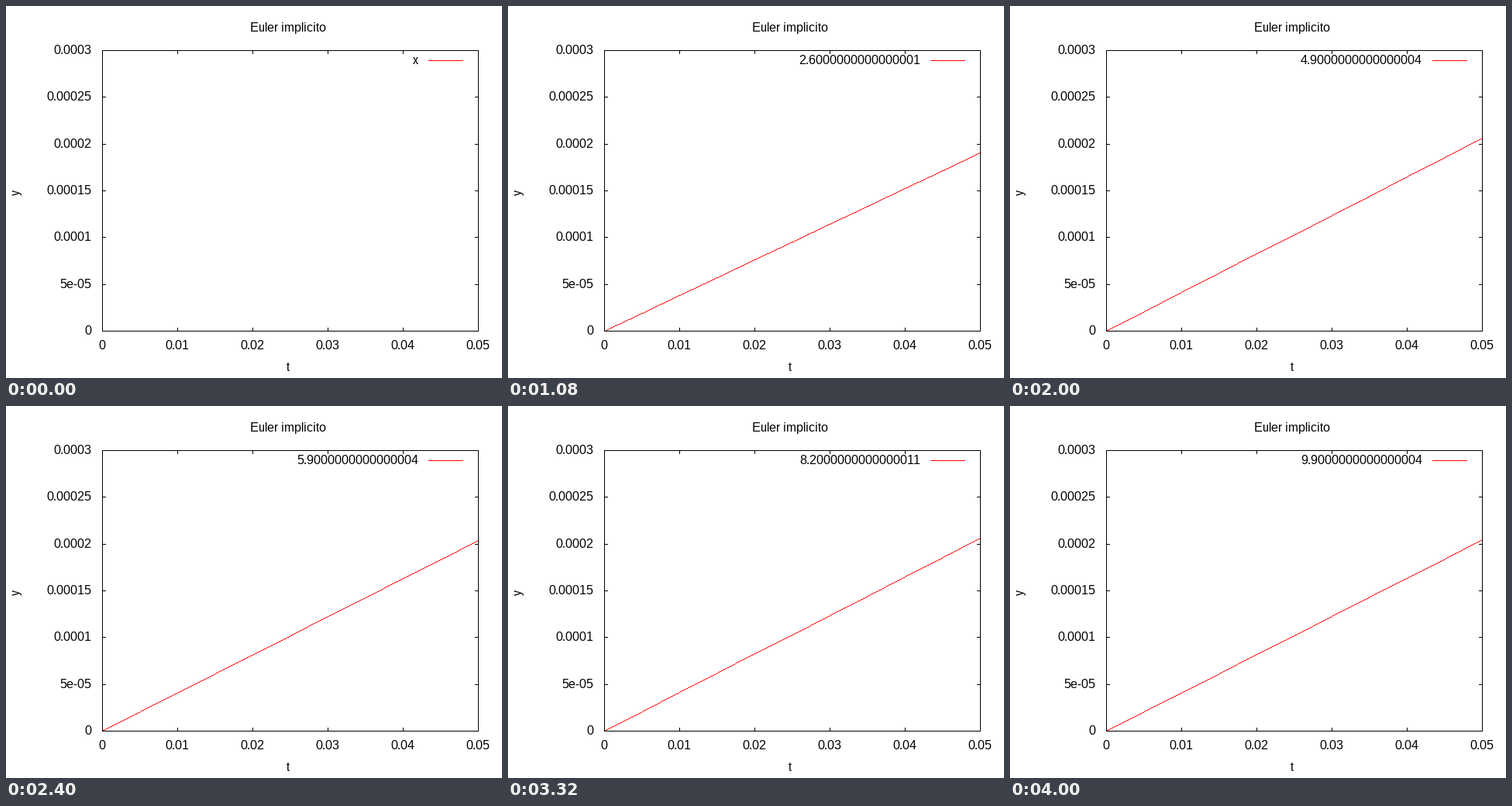
A matplotlib script that plays this animation: 640x480 px, repeating every 4.04 s.

```python
import numpy as np
import matplotlib.pyplot as plt
from matplotlib.animation import FuncAnimation
from matplotlib.patches import Polygon, Rectangle

W, H, DPI = 640, 480, 100
LEFT, RIGHT, TOP, BOTTOM = 124, 609, 57, 419
X_MAX, Y_MAX = 0.05, 3e-4
STEP, FRAMES = 0.1, 101

plt.rcParams["font.family"] = "Liberation Sans"
plt.rcParams["font.size"] = 16 * 72 / DPI
# Thin, pixel-fitted glyphs
plt.rcParams["text.hinting"] = "native"
plt.rcParams["text.hinting_factor"] = 1

fig = plt.figure(figsize=(W / DPI, H / DPI), dpi=DPI, facecolor="white")
ax = fig.add_axes([0, 0, 1, 1])
ax.set_xlim(0, W)
ax.set_ylim(H, 0)
ax.axis("off")


def bar(x, y, w, h, color="black"):
    ax.add_patch(Rectangle((x, y), w, h, fc=color, lw=0, antialiased=False, zorder=3))


def label(x, y, s, ha="center", **kw):
    return ax.text(x, y, s, ha=ha, va="baseline", color="black", **kw)


def nearest(v):
    return np.floor(np.asarray(v) + 0.5).astype(int)


def solve():
    """Implicit Euler for u' = -u + g(t), u the wall displacement at x = X_MAX."""
    mmhg = 133.32
    stiffness = 3e-4 * 9e5 / 5e-3**2
    load = X_MAX * 0.25 * mmhg / stiffness
    u = np.zeros(FRAMES)
    for n in range(1, FRAMES):
        g = load * mmhg * (10 + np.cos(2 * np.pi * n * STEP / 0.8))
        u[n] = (u[n - 1] + STEP * g) / (1 + STEP)
    return u


def frame_axes():
    bar(LEFT, TOP, RIGHT - LEFT + 1, 1)
    bar(LEFT, BOTTOM, RIGHT - LEFT + 1, 1)
    bar(LEFT, TOP, 1, BOTTOM - TOP + 1)
    bar(RIGHT, TOP, 1, BOTTOM - TOP + 1)
    for i in range(6):
        x = LEFT + 97 * i
        bar(x, TOP, 1, 5)
        bar(x, BOTTOM - 4, 1, 5)
        label(x, 443, f"{i * 0.01:g}")
    for i in range(7):
        y = int(nearest(BOTTOM - (BOTTOM - TOP) * i / 6))
        bar(LEFT, y, 5, 1)
        bar(RIGHT - 4, y, 5, 1)
        label(110, y + 5, f"{i * 5e-5:g}", ha="right")
    label(364, 33, "Euler implicito")
    label(364, 471, "t")
    label(18, 240, "y", rotation=90, rotation_mode="anchor")


def curve(u):
    """Outline of a one-pixel stepped line through eleven grid points."""
    s = np.linspace(0, 1, 11)
    px = nearest(LEFT + s * (RIGHT - LEFT))
    py = BOTTOM - nearest(s * u / Y_MAX * (BOTTOM - TOP))
    cols = np.arange(LEFT, RIGHT + 1)
    # Ties step upwards, as in Bresenham's algorithm
    rows = np.repeat(nearest(np.interp(cols, px, py) - 1e-6), 2)
    edges = np.column_stack([cols, cols + 1]).ravel()
    upper = np.column_stack([edges, rows])
    lower = np.column_stack([edges, rows + 1])[::-1]
    return np.vstack([upper, lower])


def key_text(n):
    if n == 0:
        return "x"
    t = (n - 1) * STEP
    return f"{t:.{17 if 0 < t < 0.99 else 16}f}"


tip = solve()
frame_axes()
bar(545, 70, 45, 1, "red")
key = label(532, 75, "x", ha="right")
line = Polygon(curve(0), closed=True, fc="red", lw=0, antialiased=False, zorder=2)
ax.add_patch(line)


def draw(n):
    line.set_xy(curve(tip[n]))
    key.set_text(key_text(n))
    return line, key


anim = FuncAnimation(fig, draw, frames=FRAMES, interval=40, repeat=True, repeat_delay=0)
plt.show()
```
